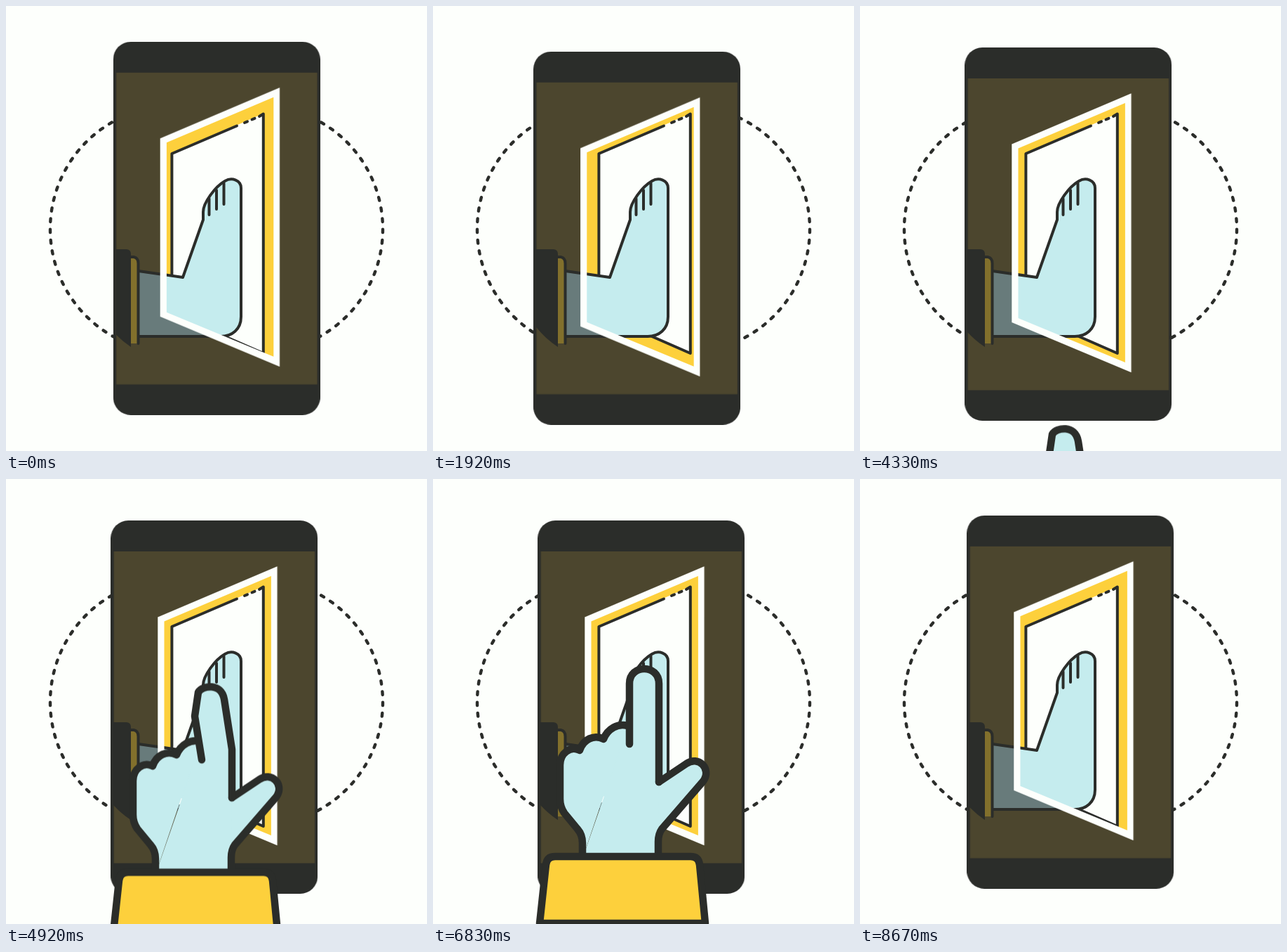
Write an HTML page that moves like this. It is 600 px wide and 633 px high and loops after 8.76 s.

```html
<!DOCTYPE html>
<html lang="en">
<head>
<meta charset="utf-8">
<title>Foot in the door</title>
<style>
  :root { --ink: #2b2d2a; --paper: #fdfffc; --yellow: #fdd03c; --blue: #c5ecee; }
  html, body { margin: 0; height: 100%; overflow: hidden; background: var(--paper); }
  svg { display: block; width: 100%; height: 100%; }

  .line { fill: none; stroke: var(--ink); stroke-width: 4; stroke-linecap: round; stroke-linejoin: round; }
  .ring { fill: none; stroke: var(--ink); stroke-width: 4.4; stroke-linecap: round; stroke-dasharray: 4.5 10.84; stroke-dashoffset: 2.25; }
  .skin { fill: var(--skin); }
  .cuff { fill: var(--cuff); }
  .dim { --skin: #687b7b; --cuff: #82702c; }
  .lit { --skin: var(--blue); --cuff: var(--yellow); }
  .bold { stroke: var(--ink); stroke-width: 10.5; stroke-linecap: round; stroke-linejoin: round; fill: var(--blue); }

  .phone { animation: drift 8760ms infinite; }
  .hand { animation: reach 8760ms infinite; }
  .finger { animation: bend 8760ms infinite; }

  @keyframes drift {
    0% { transform: translate(152.7px, 50.8px); animation-timing-function: cubic-bezier(.37, 0, .63, 1); }
    13.7% { transform: translate(135.6px, 83.2px); animation-timing-function: cubic-bezier(.37, 0, .63, 1); }
    29.9% { transform: translate(150.2px, 47.2px); animation-timing-function: cubic-bezier(.37, 0, .63, 1); }
    42.8%, 80.82% { transform: translate(149.3px, 59px); animation-timing-function: cubic-bezier(.33, 0, .67, .17); }
    100% { transform: translate(152.7px, 50.8px); }
  }
  @keyframes reach {
    0%, 47.95% { transform: translateY(372px); animation-timing-function: cubic-bezier(.33, .17, .4, 1); }
    59%, 80.37% { transform: translateY(0); animation-timing-function: cubic-bezier(.45, 0, .6, .9); }
    91.55%, 100% { transform: translateY(372px); }
  }
  @keyframes bend {
    0%, 64.8%, 93%, 100% {
      d: path("M279 377L269 315L274 281C280 271 307 267 311 291L322 362L322 431");
      animation-timing-function: ease-in-out;
    }
    71.3%, 92% { d: path("M280 377L280 330L280 291C280 263 322 263 322 291L322 365L322 431"); }
  }
</style>
</head>
<body>
<svg viewBox="0 0 600 633" preserveAspectRatio="none">
  <defs>
    <clipPath id="screen"><rect class="phone" x="4.4" y="44" width="286.4" height="443.5"/></clipPath>
    <clipPath id="window"><path class="phone" d="M76.2 143.5L228.6 79V448L76.2 385z"/></clipPath>

    <circle id="ring" class="ring" cx="362" cy="317.3" r="175" transform="rotate(180 362 317.3)"/>

    <g id="leg">
      <path class="cuff" d="M177 357H182Q188.5 358 188.5 366V480H177z"/>
      <path class="skin" d="M189 377L252 386L281 304V293C281 280 298 257 312 249C322 243 335 248 335 259V442C335 460 322 470 306 470H189z"/>
      <path class="line" d="M189 377L252 386L281 304V293C281 280 298 257 312 249C322 243 335 248 335 259V442C335 460 322 470 306 470H189"/>
      <path class="line" d="M289.5 274V297M300 262V289M310.5 252V282M176 357H182Q188.5 358 188.5 366V480"/>
      <path fill="#2b2d2a" d="M120 346H171Q178 346 178 353V485Q152 468 134 438z"/>
    </g>
  </defs>

  <use href="#ring"/>
  <use href="#ring" transform="translate(600) scale(-1 1)"/>

  <g class="phone">
    <rect width="295" height="531" rx="25" fill="#2b2d2a"/>
    <rect x="4.4" y="44" width="286.4" height="443.5" fill="#4c462e"/>
  </g>

  <g clip-path="url(#screen)"><use href="#leg" class="dim"/></g>

  <path class="phone" fill="#fdfffc" d="M67 137.5L237.3 65.3V462.3L67 391z"/>

  <g clip-path="url(#window)">
    <rect width="600" height="633" fill="#fdd03c"/>
    <path fill="#fdfffc" d="M236.4 210L366.8 153V494L236.4 437z"/>
    <path class="line" d="M236.4 437V210L329 170.5M340 166l4-1.7M350.5 161.5l4-1.7M361 157l5.8-3.5V494L236.4 437"/>
    <use href="#leg" class="lit"/>
  </g>

  <g class="hand">
    <path fill="#c5ecee" d="M213 540L279 351L322 360V540z"/>
    <path class="bold" d="M213 540V518Q213 506 206 498L187 475Q181 466 181 455V407C181 390 196 379 209 386C214 370 230 363 243 370C249 355 264 347 277 351"/>
    <path class="bold" d="M322 431L361 405C378 393 398 412 385 430L326 498Q321 505 321 516V540"/>
    <path class="bold finger" d="M279 377L269 315L274 281C280 271 307 267 311 291L322 362L322 431"/>
    <path class="bold" style="fill: var(--yellow)" d="M152 632L161 549Q162 537 174 537H367Q379 537 380 549L388 632z"/>
  </g>
</svg>
</body>
</html>
```
